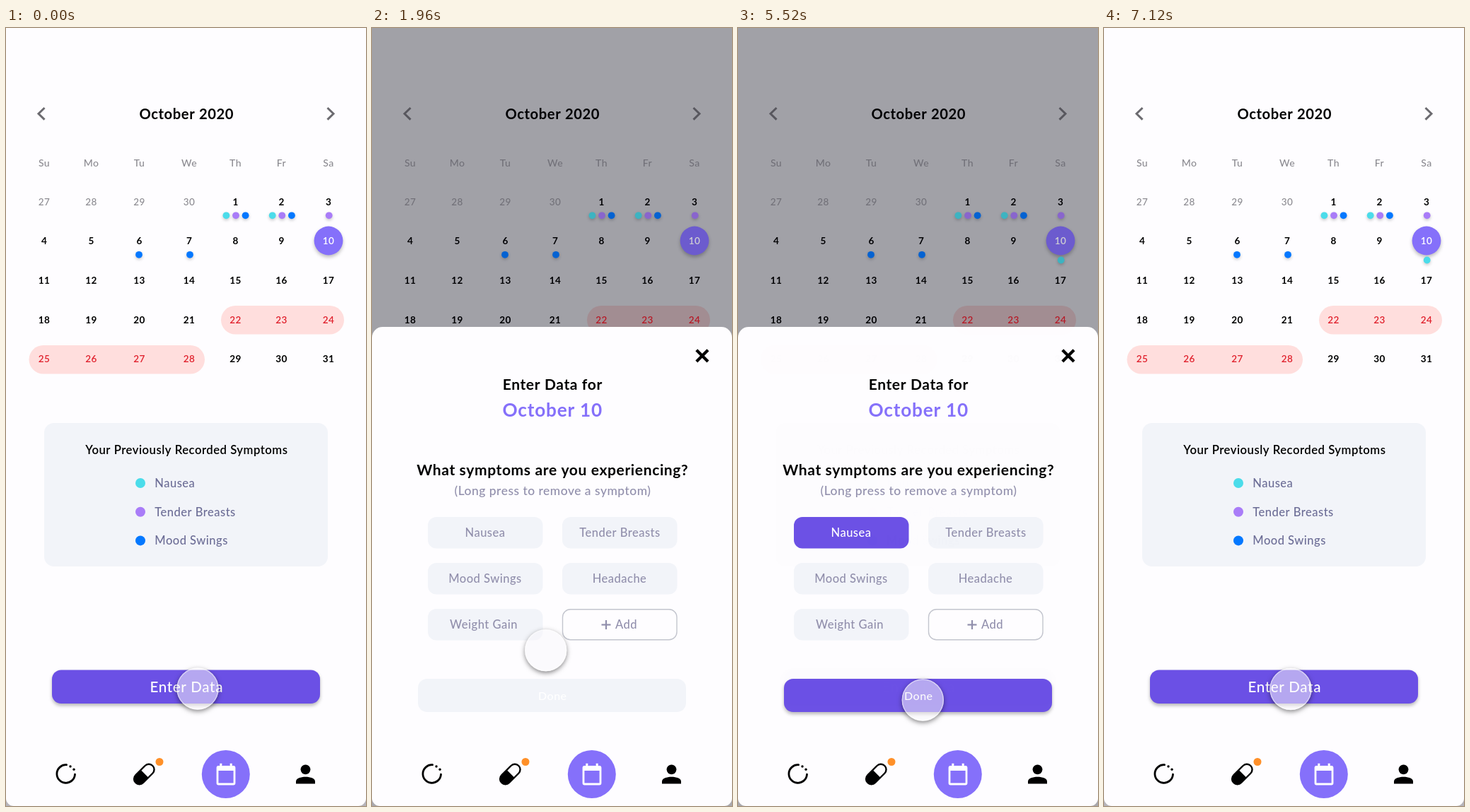
These frames come from a looping animation (509x1101 px, 7.32 s). An HTML page with a canvas:

```html
<!DOCTYPE html>
<html lang="en">
<head>
<meta charset="utf-8">
<title>Symptom calendar</title>
<style>
html, body { margin: 0; width: 100%; height: 100%; overflow: hidden; background: #fefdff; }
canvas { display: block; width: 509px; height: 1101px; }
</style>
</head>
<body>
<canvas id="stage"></canvas>
<script>
const W = 509, H = 1101, LOOP = 7320;
const WHITE = '#fefdff', PALE = '#f2f4f9', DEEP = '#6b50e5', VIOLET = '#8570fa';
const CYAN = '#4bdcea', LILAC = '#a97cf8', BLUE = '#0478ff', RED = '#e0202c';
const MUTED = '#918fac', SLATE = '#6c6d96', GREY = '#8b8a90';
const COLS = [54, 120.5, 188.5, 259, 324.5, 389.5, 456];
const ROWS = [246, 301.5, 357, 412.7, 468.3];
const dpr = window.devicePixelRatio || 1;

function prepare(canvas) {
  canvas.width = W * dpr;
  canvas.height = H * dpr;
  const c = canvas.getContext('2d');
  c.scale(dpr, dpr);
  return c;
}

function layer(draw) {
  const canvas = document.createElement('canvas');
  draw(prepare(canvas));
  return canvas;
}

// y is the middle of the capital letters
function text(c, str, x, y, size, weight, color, align = 'center') {
  c.font = `${weight} ${size}px Lato, "Open Sans", sans-serif`;
  c.letterSpacing = `${size * 0.03}px`;
  c.textAlign = align;
  c.fillStyle = color;
  c.fillText(str, x, y + size * 0.36);
}

function box(c, x, y, w, h, r, color) {
  c.beginPath();
  c.roundRect(x, y, w, h, r);
  c.fillStyle = color;
  c.fill();
}

function disc(c, x, y, r, color) {
  c.beginPath();
  c.arc(x, y, r, 0, 7);
  c.fillStyle = color;
  c.fill();
}

function line(c, points, width, color) {
  c.beginPath();
  points.forEach(([x, y]) => c.lineTo(x, y));
  c.lineWidth = width;
  c.strokeStyle = color;
  c.stroke();
}

function shaded(c, dy, blur, alpha, draw) {
  c.save();
  c.shadowColor = `rgba(0,0,0,${alpha})`;
  c.shadowOffsetY = dy * dpr;
  c.shadowBlur = blur * dpr;
  draw();
  c.restore();
}

function page(c) {
  c.fillStyle = '#b6b4ba';
  c.fillRect(0, H - 14, W, 14);
  box(c, 0, 0, W, H, [0, 0, 11, 11], WHITE);
}

function dim(c, alpha) {
  c.fillStyle = `rgba(4,4,16,${alpha})`;
  c.fillRect(0, 0, W, 460);
}

function nav(c) {
  // cycle ring
  c.lineCap = 'round';
  c.lineWidth = 2.8;
  c.strokeStyle = '#000';
  c.beginPath();
  c.arc(84.7, 1055.5, 12.8, -1.5, 0.05, true);
  c.stroke();
  disc(c, 91, 1045, 1.7, '#000');
  disc(c, 96, 1049.3, 1.7, '#000');

  // pill
  c.save();
  c.translate(195.3, 1056);
  c.rotate(-Math.PI / 4);
  c.beginPath();
  c.roundRect(-17, -7.6, 34, 15.2, 7.6);
  c.lineWidth = 2.4;
  c.stroke();
  box(c, -17, -7.6, 18, 15.2, [7.6, 0, 0, 7.6], '#000');
  c.restore();
  disc(c, 217, 1038.5, 5.5, '#ff9029');

  // calendar
  disc(c, 310.8, 1056, 34, VIOLET);
  c.beginPath();
  c.roundRect(299, 1045.5, 24, 24.5, 1.5);
  c.lineWidth = 2.8;
  c.strokeStyle = '#fff';
  c.stroke();
  box(c, 298, 1044.5, 26, 6.5, 2, '#fff');
  box(c, 302.3, 1040.8, 3, 6, 0.5, '#fff');
  box(c, 316.7, 1040.8, 3, 6, 0.5, '#fff');

  // person
  disc(c, 423.5, 1049.3, 6.9, '#000');
  c.beginPath();
  c.moveTo(410, 1069.5);
  c.lineTo(410, 1066);
  c.bezierCurveTo(410, 1057.5, 437, 1057.5, 437, 1066);
  c.lineTo(437, 1069.5);
  c.closePath();
  c.fillStyle = '#000';
  c.fill();
}

function marks(c, x, y, colors) {
  colors.forEach((color, i) =>
    shaded(c, 2, 4, 0.22, () => disc(c, x + i * 13.6, y, 4.9, color)));
}

// The page dims more than the days and marks on it.
function month(c, logged, dimmed) {
  page(c);
  box(c, 304, 393, 174, 40.5, 20.2, '#ffdedd');
  box(c, 32.5, 449, 248.5, 40.5, 20.2, '#ffdedd');
  if (dimmed) dim(c, 0.22);

  c.lineCap = 'butt';
  line(c, [[54.5, 113], [46, 121.3], [54.5, 129.6]], 3, '#6c6b70');
  line(c, [[454.5, 113], [463, 121.3], [454.5, 129.6]], 3, '#6c6b70');
  text(c, 'October 2020', 255.3, 121.5, 20.2, 700, '#000');

  ['Su', 'Mo', 'Tu', 'We', 'Th', 'Fr', 'Sa'].forEach((d, i) =>
    text(c, d, COLS[i], 190.7, 14, 500, GREY));

  shaded(c, 3, 5, 0.25, () => disc(c, 456, 301, 20.4, VIOLET));

  for (let i = 0; i < 35; i++) {
    const day = i < 4 ? 27 + i : i - 3;
    const late = i > 3;
    let color = late ? '#000' : GREY;
    if (late && day === 10) color = '#fff';
    if (late && day > 21 && day < 29) color = RED;
    const weight = !late ? 500 : color === '#000' ? 700 : 600;
    text(c, String(day), COLS[i % 7], ROWS[Math.floor(i / 7)], 13.5, weight, color);
  }

  marks(c, 311.4, 265.3, [CYAN, LILAC, BLUE]);
  marks(c, 376.7, 265.3, [CYAN, LILAC, BLUE]);
  marks(c, 456.7, 265.3, [LILAC]);
  marks(c, 188, 320.8, [BLUE]);
  marks(c, 260, 320.8, [BLUE]);
  if (logged) marks(c, 456.7, 328.5, [CYAN]);
  if (dimmed) dim(c, 0.19);
}

function calendar(c, logged) {
  month(c, logged, false);
  box(c, 54, 559, 401, 203, 14, PALE);
  text(c, 'Your Previously Recorded Symptoms', 255.3, 596.5, 16.7, 600, '#000');
  [['Nausea', CYAN], ['Tender Breasts', LILAC], ['Mood Swings', BLUE]].forEach(([name, color], i) => {
    const y = 644 + i * 40.7;
    disc(c, 190, y, 7, color);
    text(c, name, 210.3, y, 16.5, 500, SLATE, 'left');
  });

  shaded(c, 3, 5, 0.28, () => box(c, 65, 908.5, 379, 47.5, 13, DEEP));
  text(c, 'Enter Data', 255.3, 932.5, 20.6, 500, '#fff');
  nav(c);
}

function chip(c, name, x, y, cx, on) {
  box(c, x, y, 162.5, 44.5, 12, on ? DEEP : PALE);
  text(c, name, cx, y + 22.5, 16.5, 500, on ? '#fff' : MUTED);
}

function sheet(c, chosen) {
  month(c, chosen, true);
  c.fillStyle = '#a9a8ad';
  c.fillRect(0, 460, W, H - 460);
  box(c, 0, 423, W, H - 423, [15, 15, 11, 11], WHITE);

  c.lineCap = 'butt';
  line(c, [[458.8, 455.8], [475, 472]], 4.2, '#000');
  line(c, [[475, 455.8], [458.8, 472]], 4.2, '#000');

  text(c, 'Enter Data for', 255.3, 504.5, 21, 700, '#000');
  text(c, 'October 10', 255.3, 541, 26.2, 700, VIOLET);
  text(c, 'What symptoms are you experiencing?', 255.3, 625, 21, 700, '#000');
  text(c, '(Long press to remove a symptom)', 255.5, 655, 17.4, 500, MUTED);

  chip(c, 'Nausea', 79, 692, 160, chosen);
  chip(c, 'Tender Breasts', 269, 692, 350.5, false);
  chip(c, 'Mood Swings', 79, 757, 160, false);
  chip(c, 'Headache', 269, 757, 350, false);
  chip(c, 'Weight Gain', 79, 822, 158, false);

  c.beginPath();
  c.roundRect(269.5, 822.7, 161.5, 43, 11);
  c.lineWidth = 1.4;
  c.strokeStyle = '#c3c5ce';
  c.stroke();
  line(c, [[324.5, 844.5], [337.5, 844.5]], 2.2, MUTED);
  line(c, [[331, 838], [331, 851]], 2.2, MUTED);
  text(c, 'Add', 344, 844.5, 16.5, 500, MUTED, 'left');

  const done = () => box(c, 65, 921, 379, 47, 13, chosen ? DEEP : PALE);
  if (chosen) shaded(c, 3, 5, 0.28, done);
  else done();
  text(c, 'Done', 255.3, 944.8, 16, 500, '#fff');
  nav(c);
}

const clamp = v => Math.min(1, Math.max(0, v));
const easeOut = t => Math.sin(t * Math.PI / 2);
const smooth = t => t * t * (3 - 2 * t);

// pointer path: start, end, from, to, easing
const MOVES = [
  [1640, 2600, [271, 935], [174, 726.5], smooth],
  [3960, 4320, [174, 726.5], [261.3, 951], t => 1 - (1 - t) ** 2],
  [6400, 6920, [261.3, 951], [272, 935.5], smooth],
  [6980, 7120, [272, 935.5], [264, 935.5], smooth]
];

function pointerAt(t) {
  let pos = MOVES[0][2];
  for (const [start, end, from, to, ease] of MOVES) {
    if (t < start) break;
    const k = ease(clamp((t - start) / (end - start)));
    pos = from.map((v, i) => v + (to[i] - v) * k);
  }
  return pos;
}

function pointer(c, [x, y]) {
  c.save();
  c.beginPath();
  c.rect(x - 60, y - 60, 120, 120);
  c.arc(x, y, 29.5, 0, 2 * Math.PI);
  c.clip('evenodd');
  shaded(c, 2.5, 7, 0.5, () => disc(c, x, y, 29.3, '#ddd'));
  c.restore();
  disc(c, x, y, 29.7, 'rgba(249,248,251,0.52)');
  c.beginPath();
  c.arc(x, y, 29, 0, 7);
  c.lineWidth = 1.5;
  c.strokeStyle = 'rgba(255,255,255,0.45)';
  c.stroke();
}

const ctx = prepare(document.getElementById('stage'));
const before = layer(c => calendar(c, false));
const empty = layer(c => sheet(c, false));
const filled = layer(c => sheet(c, true));
const after = layer(c => calendar(c, true));

// dissolves: start, duration, from, to
const FADES = [
  [576, 500, before, empty],
  [3360, 300, empty, filled],
  [5520, 500, filled, after]
];

function render(t) {
  let [from, to, mix] = [before, before, 0];
  for (const [start, length, a, b] of FADES) {
    if (t >= start) [from, to, mix] = [a, b, easeOut(clamp((t - start) / length))];
  }
  ctx.globalAlpha = 1;
  ctx.drawImage(from, 0, 0, W, H);
  if (mix > 0) {
    ctx.globalAlpha = mix;
    ctx.drawImage(to, 0, 0, W, H);
    ctx.globalAlpha = 1;
  }
  pointer(ctx, pointerAt(t));
}

const begin = performance.now();
function tick() {
  render((performance.now() - begin) % LOOP);
  requestAnimationFrame(tick);
}
tick();
</script>
</body>
</html>
```
